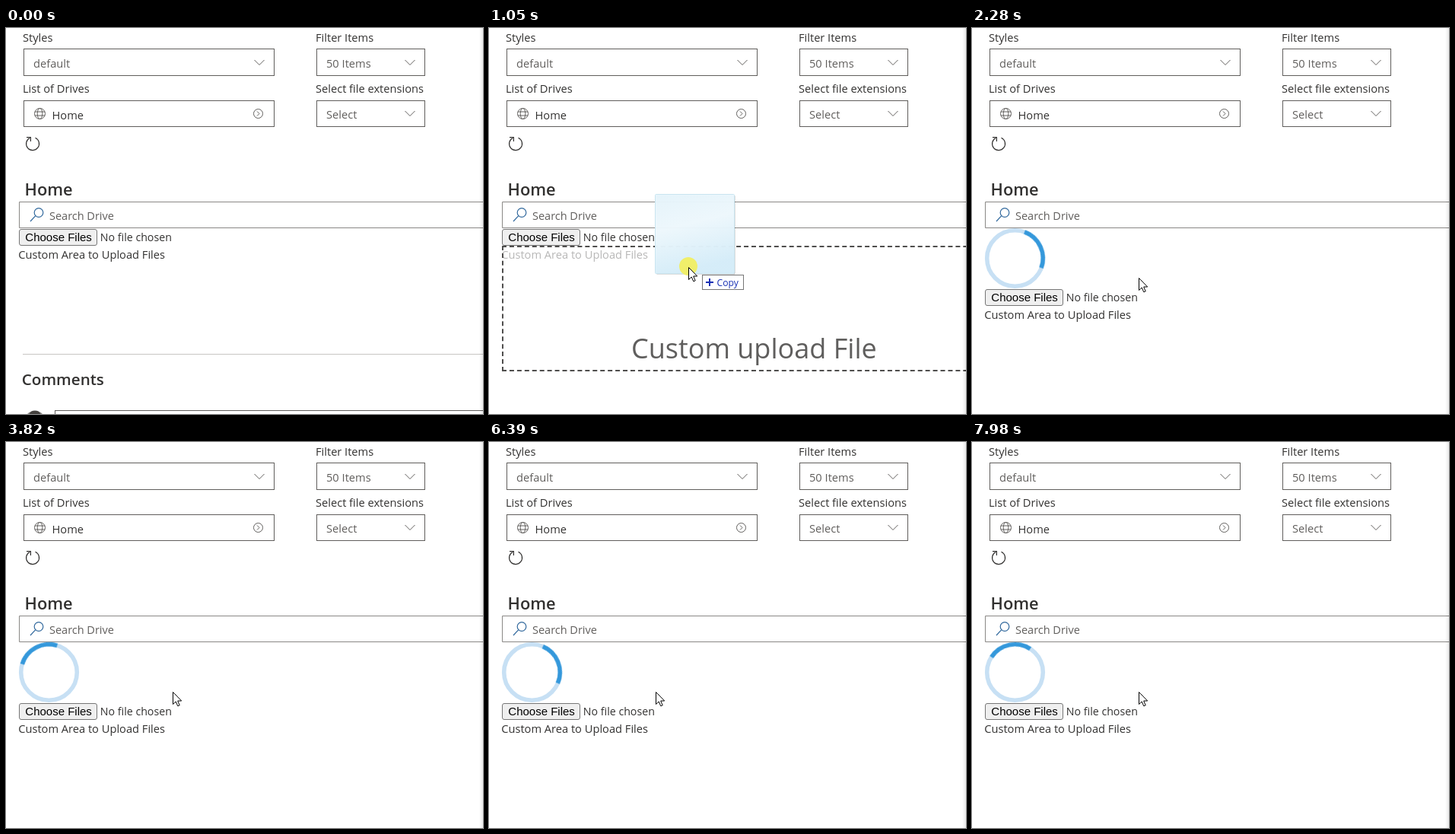
Animation, 627 px wide and 507 px high, one loop 8 s. Source, as an HTML page:

```html
<!DOCTYPE html>
<html lang="en">
<head>
<meta charset="utf-8">
<title>File upload</title>
<style>
  html, body { margin: 0; width: 100%; height: 100%; overflow: hidden; background: #fff; }
  .stage { position: relative; width: 627px; height: 507px; overflow: hidden; background: #fff; }
  svg { position: absolute; left: 0; top: 0; font: 14.65px "Open Sans", "Noto Sans", sans-serif; fill: #323130; }
  .line { fill: none; stroke: #605e5c; }
  .hint { fill: #605e5c; }
  .head { font-weight: 600; font-size: 21.8px; }

  .zone {
    position: absolute; left: 17px; top: 286px; width: 662px; height: 165px;
    box-sizing: border-box; border: 2px dashed #4f4e4d; background: rgba(255, 255, 255, .65);
  }
  .edge {
    position: absolute; right: 0; top: 0; width: 5px; height: 100%;
    background: linear-gradient(90deg, rgba(0, 0, 0, 0), rgba(0, 0, 0, .09));
  }

  .comments, .zone, .title, .row, .drag, .spin, .idle { animation: 8s step-end infinite; }
  .comments { animation-name: comments; }
  .zone, .title { animation-name: zone; }
  .row { animation-name: row; }
  .drag { animation-name: drag; }
  .spin, .idle { animation-name: loading; }
  .arc { transform-origin: 56.5px 302.5px; animation: turn 8s linear infinite; }

  @keyframes comments { 0% { opacity: 1; } 8.86%, 100% { opacity: 0; } }
  @keyframes zone { 0% { opacity: 0; } 8.86% { opacity: 1; } 22.61%, 100% { opacity: 0; } }
  @keyframes loading { 0% { opacity: 0; } 22.61%, 100% { opacity: 1; } }
  @keyframes row { 0% { transform: none; } 22.61%, 100% { transform: translateY(79px); } }
  @keyframes drag {
    0% { opacity: 0; transform: translate(636px, 215px); }
    6.24% { opacity: 1; transform: translate(636px, 215px); }
    7.11% { opacity: 1; transform: translate(590px, 222px); }
    7.99% { opacity: 1; transform: translate(468px, 258px); }
    8.86% { opacity: 1; transform: translate(418px, 281px); }
    9.61% { opacity: 1; transform: translate(331px, 285px); }
    10.49% { opacity: 1; transform: translate(290px, 305px); }
    11.36% { opacity: 1; transform: translate(268px, 313px); }
    12.24% { opacity: 1; transform: translate(262px, 314px); }
    13.99% { opacity: 1; transform: translate(256px, 317px); }
    14.86% { opacity: 1; transform: translate(238px, 324px); }
    15.74% { opacity: 1; transform: translate(212px, 329px); }
    16.61% { opacity: 1; transform: translate(210px, 327px); }
    17.49% { opacity: 1; transform: translate(214px, 329px); }
    19.11% { opacity: 1; transform: translate(220px, 329px); }
    22.61%, 100% { opacity: 0; transform: translate(220px, 329px); }
  }
  /* one step per 70 ms or so, close to two seconds a turn */
  @keyframes turn {
    0% { transform: rotate(-18deg); animation-timing-function: step-end; }
    22.61% { transform: rotate(-18deg); animation-timing-function: steps(7); }
    28.49% { transform: rotate(65deg); animation-timing-function: steps(22); }
    47.74% { transform: rotate(332deg); animation-timing-function: steps(15); }
    60.37% { transform: rotate(513deg); animation-timing-function: steps(23); }
    79.87% { transform: rotate(788deg); animation-timing-function: steps(23); }
    99.74%, 100% { transform: rotate(1068deg); }
  }
</style>
</head>
<body>
<div class="stage">
  <svg width="627" height="507">
    <defs>
      <path id="chevron" class="line" d="M0 0L6.5 6.5L13 0"/>
      <path id="arrow" d="M.5 .5V16.5L4.2 13L6.8 18.8L9.2 17.8L6.7 12H11.7Z" fill="#fff" stroke="#000" stroke-linejoin="round"/>
      <linearGradient id="glass" x1="0" y1="0" x2=".25" y2="1">
        <stop offset="0" stop-color="#e6f5fc"/>
        <stop offset=".45" stop-color="#eff9fe"/>
        <stop offset="1" stop-color="#d6eefa"/>
      </linearGradient>
    </defs>

    <text x="22" y="18">Styles</text>
    <text x="407" y="18">Filter Items</text>
    <text x="22" y="85">List of Drives</text>
    <text x="407" y="85">Select file extensions</text>

    <g class="line">
      <rect x="23.5" y="27.5" width="329" height="35"/>
      <rect x="408.5" y="27.5" width="142" height="35"/>
      <rect x="23.5" y="95.5" width="329" height="34"/>
      <rect x="408.5" y="95.5" width="142" height="34"/>
    </g>
    <g class="hint">
      <text x="36" y="52">default</text>
      <text x="421" y="52">50 Items</text>
      <text x="421" y="119">Select</text>
    </g>
    <text x="60.5" y="120">Home</text>
    <use href="#chevron" x="326.5" y="42"/>
    <use href="#chevron" x="524.5" y="42"/>
    <use href="#chevron" x="524.5" y="109"/>

    <g class="line">
      <circle cx="44.5" cy="112.5" r="7"/>
      <ellipse cx="44.5" cy="112.5" rx="3.3" ry="7"/>
      <path d="M38 110H51M38 115H51"/>
      <circle cx="331.5" cy="112.5" r="6"/>
      <path d="M330 109.5L333 112.5L330 115.5"/>
    </g>
    <g class="line" style="stroke: #323130; stroke-width: 1.2">
      <path d="M38.5 144.3A8.5 8.5 0 1 1 31.2 144.5"/>
      <path d="M27 143.6H32.4V149"/>
    </g>

    <text class="head" x="24.6" y="220">Home</text>
    <path class="line" d="M640 228.5H17.5V262.5H640" style="stroke: #8a8886"/>
    <g fill="none" stroke="#336a9e" stroke-width="1.2">
      <circle cx="43" cy="242.5" r="5.8"/>
      <path d="M38.8 246.7L32 254"/>
    </g>
    <text class="hint" x="57" y="252" font-size="14.5">Search Drive</text>

    <g class="spin" fill="none" stroke-width="5.6">
      <circle cx="56.5" cy="302.5" r="36.8" stroke="#c7e0f4"/>
      <circle class="arc" cx="56.5" cy="302.5" r="36.8" stroke="#3498db"
        pathLength="360" stroke-dasharray="90 270" stroke-dashoffset="135"/>
    </g>

    <g class="row">
      <rect x="17.5" y="264.5" width="102" height="21" rx="2.5" fill="#efefef" stroke="#767676"/>
      <text x="25.3" y="280" fill="#000" style="font: 15px 'Liberation Sans', Arial, sans-serif">Choose Files</text>
      <text x="123.8" y="280" style="font-size: 14.2px">No file chosen</text>
      <text x="16.2" y="303">Custom Area to Upload Files</text>
    </g>

    <g class="comments">
      <path class="line" d="M22 428.5H627" style="stroke: #c8c6c4"/>
      <text class="head" x="20.8" y="469" style="font-size: 20.6px">Comments</text>
      <ellipse cx="38" cy="510" rx="11" ry="7" fill="#8b8986"/>
      <ellipse cx="38" cy="507" rx="7" ry="4.5" fill="#45423f"/>
      <rect class="line" x="64.5" y="502.5" width="600" height="60"/>
    </g>
  </svg>

  <div class="zone"></div>

  <svg width="627" height="507">
    <text class="title" x="187" y="434" style="font-size: 36px; fill: #5f5e5d">Custom upload File</text>
    <g class="drag">
      <rect x="-42" y="-94" width="103.5" height="103.5" rx="1" fill="#000" opacity=".25"/>
      <rect x="-43.5" y="-95.5" width="104" height="104" rx="1" fill="url(#glass)" stroke="#c9e4ef" fill-opacity=".97"/>
      <circle cx="0" cy="-1" r="12" fill="#f2ef5e" opacity=".92"/>
      <rect x="18.5" y="10.5" width="54" height="19" fill="#fff" stroke="#767676"/>
      <path d="M23 20H33M28 15V25" stroke="#1a32b4" stroke-width="2"/>
      <text x="37.5" y="25" style="font-size: 12.2px; fill: #1a32b4">Copy</text>
      <use href="#arrow"/>
    </g>
    <g class="idle"><use href="#arrow" x="219" y="328"/></g>
  </svg>

  <div class="edge"></div>
</div>
</body>
</html>
```
